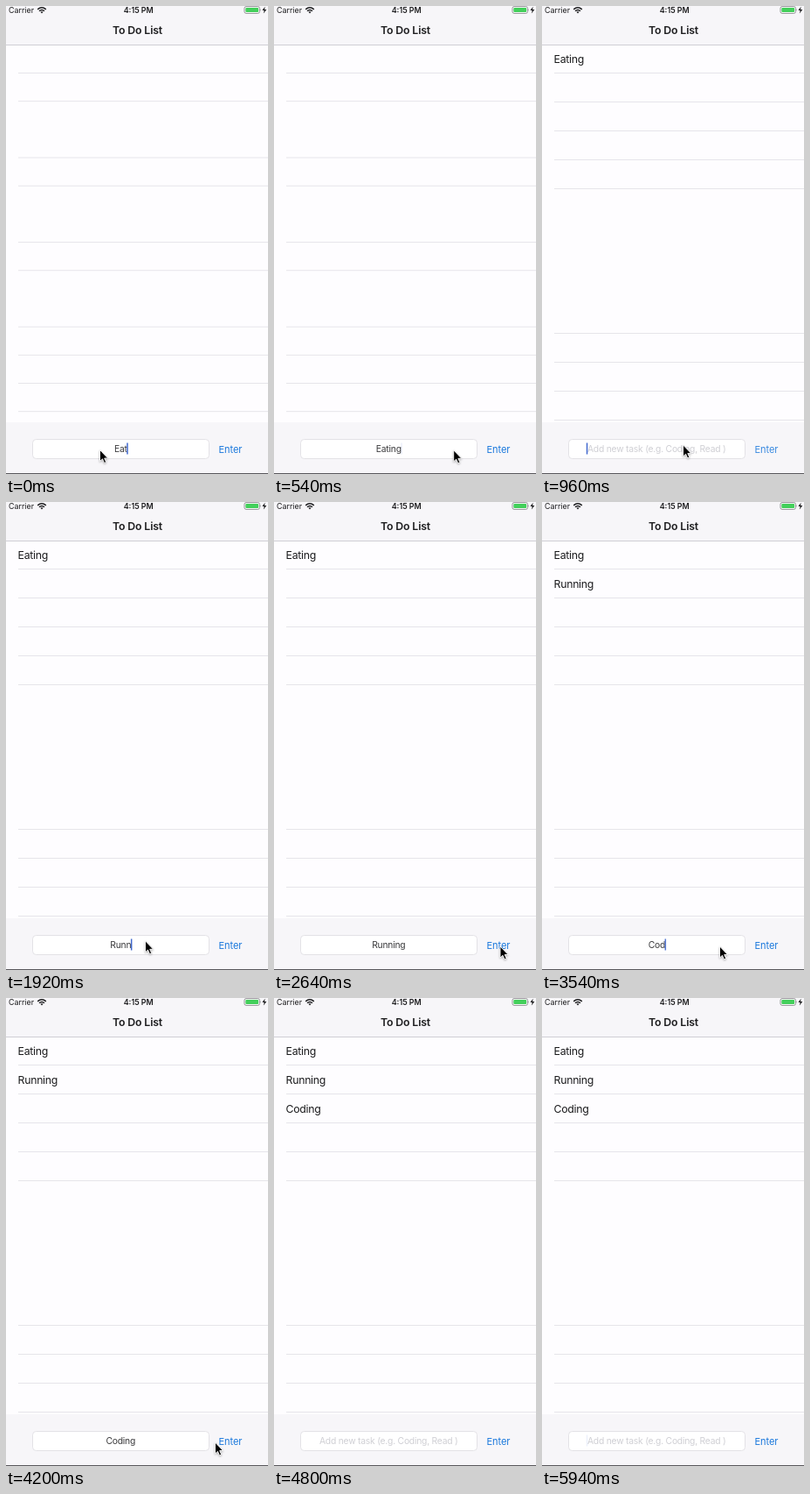
An HTML page that plays this animation: 300x534 px, repeating every 6000 ms.

```html
<!DOCTYPE html>
<html lang="en">
<head>
<meta charset="utf-8">
<title>To Do List</title>
<style>
  html, body { margin: 0; width: 100%; height: 100%; overflow: hidden; background: #fff; }
  svg { display: block; width: 300px; height: 534px; }
  text { font-family: Inter, "Liberation Sans", sans-serif; fill: #1c1c1e; }
  .status { font-size: 8.9px; }
  .title { font-size: 12.3px; font-weight: 600; letter-spacing: -.13px; }
  .row { font-size: 12.3px; letter-spacing: -.3px; }
  .field, .hint { font-size: 10.3px; letter-spacing: -.22px; fill: #3a3a3c; }
  .hint { fill: #cfcfd4; }
  .enter { font-size: 11px; letter-spacing: -.1px; fill: #1a78dc; }
  .mid { text-anchor: middle; }
  .lines { fill: none; stroke: #e6e5ea; }
  #pointer { filter: drop-shadow(0 1px 1px rgba(0, 0, 0, .3)); }
</style>
</head>
<body>
<svg viewBox="0 0 300 534">
  <rect width="300" height="534" fill="#fefdff"/>
  <rect width="300" height="44" fill="#f7f6f9"/>
  <rect y="44" width="300" height="1" fill="#d0cfd4"/>

  <text class="status" x="3" y="8">Carrier</text>
  <path d="M36.2 3.9Q41 -.3 45.8 3.9M38 5.8Q41 3.2 44 5.8" fill="none" stroke="#1c1c1e" stroke-width="1.5"/>
  <path d="M39.4 6.8Q41 5.6 42.6 6.8L41 8.6Z" fill="#1c1c1e"/>
  <text class="status mid" x="151.7" y="8" font-weight="600">4:15 PM</text>
  <rect x="273" y=".6" width="17.4" height="7.8" rx="2" fill="#fff" stroke="#77777b" stroke-width=".8"/>
  <rect x="274.3" y="1.9" width="14.8" height="5.2" rx="1" fill="#43cf5b"/>
  <path d="M291.3 3.2q1.2 1.3 0 2.6z" fill="#77777b"/>
  <path d="M296.6 .8L293.4 5.1H295.6L294.9 8.4L298.3 3.9H296Z" fill="#1c1c1e"/>

  <text class="title mid" x="150.5" y="32.3">To Do List</text>

  <path id="empty" class="lines"/>
  <path id="filled" class="lines"/>
  <g id="rows"></g>

  <rect y="475" width="300" height="59" fill="#f7f6f9"/>
  <rect x="30.5" y="494.5" width="202" height="22" rx="4" fill="#fff" stroke="#e3e2e6"/>
  <text id="hint" class="hint mid" x="131.3" y="508.8">Add new task (e.g. Coding, Read )</text>
  <text id="field" class="field mid" x="131.3" y="508.8"></text>
  <rect id="caret" y="498.5" width="1.5" height="13" fill="#4169cf"/>
  <text id="enter" class="enter" x="243.6" y="509.8">Enter</text>
  <rect y="533" width="300" height="1" fill="#58585c"/>

  <path id="pointer" d="M0 0V13L3 10.3L5 14.9L7.2 14L5.2 9.5H9.1Z"
        stroke="#fff" stroke-width=".9" stroke-linejoin="round"/>
</svg>
<script>
const LOOP = 6000, STEP = 60, MID = 131.3;
const ENTER = { x: 259, y: 507 }, AWAY = { x: 262, y: 540 };
const $ = id => document.getElementById(id);

// type: time of the first letter, gap: time per letter, add: time the row appears
const tasks = [
  { word: 'Eating', type: -210, gap: 90, add: 780, rest: { x: 107.5, y: 506.5 } },
  { word: 'Running', type: 1500, gap: 110, add: 2760, rest: { x: 159.5, y: 500.8 } },
  { word: 'Coding', type: 3340, gap: 100, add: 4440, rest: { x: 203.5, y: 507 } }
];

const clamp = v => Math.min(1, Math.max(0, v));
const show = (el, on) => el.setAttribute('visibility', on ? 'visible' : 'hidden');

function ease(t, start, length) {
  const u = clamp((t - start) / length);
  return u * u * (3 - 2 * u);
}

// Thirteen separators, without those of the blank rows
function separators(gap, isBlank) {
  let d = '';
  for (let k = 0; k < 13; k++) if (!isBlank(k)) d += `M14 ${76.5 + gap * k}H300`;
  return d;
}
$('empty').setAttribute('d', separators(32.18, k => k % 3 === 2 && k < 9));
$('filled').setAttribute('d', separators(33, k => k > 4 && k < 9));

tasks.forEach((task, i) => {
  task.row = document.createElementNS('http://www.w3.org/2000/svg', 'text');
  task.row.setAttribute('class', 'row');
  task.row.setAttribute('x', 13.6);
  task.row.setAttribute('y', 65.3 + 33 * i);
  task.row.textContent = task.word;
  $('rows').append(task.row);
});

// Typed text and the time of the last key press or tap
function input(t) {
  const task = tasks.findLast(k => t >= k.type);
  if (t >= task.add) return { text: '', at: task.add };
  const count = Math.min(task.word.length, 1 + Math.floor((t - task.type) / task.gap));
  return { text: task.word.slice(0, count), at: task.type + (count - 1) * task.gap };
}

// The pointer goes from each resting place to the button and on to the next
function pointerAt(t) {
  const pos = { ...tasks[0].rest };
  const move = (to, u) => {
    pos.x += (to.x - pos.x) * u;
    pos.y += (to.y - pos.y) * u;
  };
  tasks.forEach(({ add }, i) => {
    move(ENTER, ease(t, add - 420, 300));
    move(i + 1 < tasks.length ? tasks[i + 1].rest : AWAY, ease(t, add - 30, 230));
  });
  return pos;
}

function draw(t) {
  const { text, at } = input(t);
  $('field').textContent = text;
  show($('hint'), !text);
  const width = $('field').getComputedTextLength();
  $('caret').setAttribute('x', text ? MID + width / 2 - .4 : 50.8);
  $('caret').setAttribute('opacity', clamp(.5 + 1.3 * Math.sin((t - at + 30) / 300 * Math.PI)));

  const tap = tasks.findLast(k => t >= k.add - STEP);
  $('enter').setAttribute('opacity', tap ? .3 + .7 * clamp((t - tap.add + STEP) / 300) : 1);

  for (const { row, add } of tasks) show(row, t >= add);
  show($('empty'), t < tasks[0].add);
  show($('filled'), t >= tasks[0].add);

  const { x, y } = pointerAt(t);
  $('pointer').setAttribute('transform', `translate(${x} ${y})`);
}

function tick() {
  draw(Math.floor(performance.now() % LOOP / STEP) * STEP);
  requestAnimationFrame(tick);
}
tick();
</script>
</body>
</html>
```
